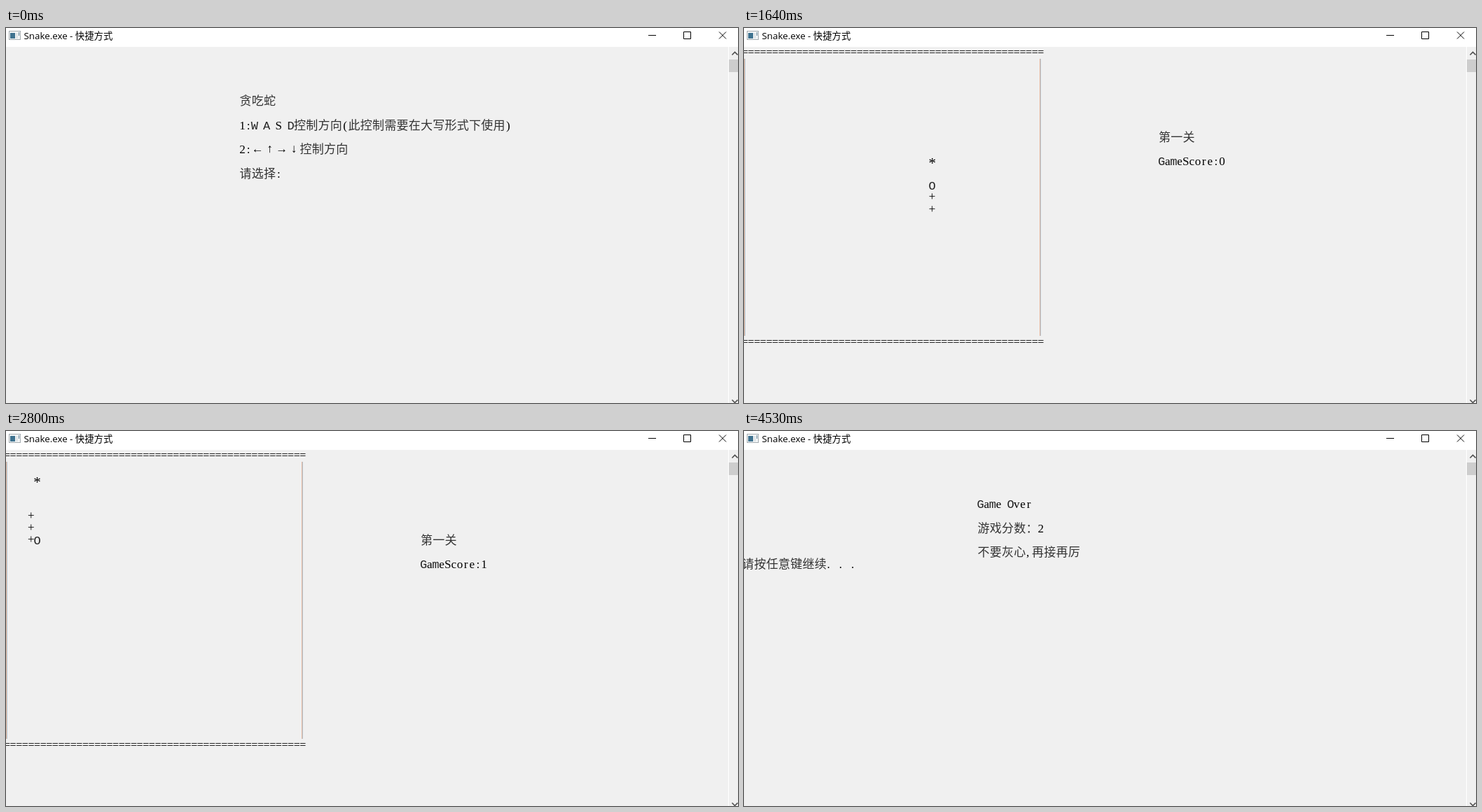
These frames come from a looping animation (1045 by 536 pixels, 4.75 s). An HTML page:

```html
<!DOCTYPE html>
<html lang="zh-CN">
<head>
<meta charset="utf-8">
<title>Snake.exe</title>
<style>
html, body { margin: 0; width: 100%; height: 100%; overflow: hidden; background: #f0f0f0; }
svg { display: block; width: 1045px; height: 536px; }
#screen text { text-anchor: middle; fill: #000; }
#screen .cjk { font: 300 17px "Noto Sans CJK SC", "Noto Sans CJK", sans-serif; fill: #333; }
.thin { font: 17px "Liberation Serif", serif; }
.star { font: 21px "Liberation Serif", serif; }
.rule { font: 16px "Liberation Serif", serif; }
#screen .mono { font: 17px "Liberation Mono", monospace; fill: #222; }
.title { font: 13.35px "Open Sans", "Noto Sans CJK SC", "Noto Sans CJK", sans-serif; }
</style>
</head>
<body>
<svg viewBox="0 0 1045 536">
  <rect width="1045" height="536" fill="#f0f0f0"/>
  <g id="screen"></g>
  <rect width="1045" height="27" fill="#fff"/>
  <rect x="4.5" y="4.5" width="16" height="12" fill="#f4f6f7" stroke="#a3abb0"/>
  <rect x="6" y="7" width="7" height="8" fill="#3f7390"/>
  <rect x="14" y="7" width="3" height="8" fill="#dfe5e8"/>
  <rect x="18" y="6" width="1" height="5" fill="#5f8296"/>
  <text class="title" x="25.5" y="15.5">Snake.exe - 快捷方式</text>
  <g fill="none" stroke="#000">
    <path d="M917 10.5h11M967.5 5.5h10v10h-10zM1018 5.5l10 10M1028 5.5l-10 10"/>
  </g>
  <rect x="1031" y="27" width="1" height="509" fill="#fff"/>
  <rect x="1032" y="45" width="13" height="18" fill="#cdcdcd"/>
  <path d="M1036.5 38.5l4-4 4 4M1036.5 531.5l4 4 4-4" fill="none" stroke="#505050" stroke-width="1.6"/>
</svg>
<script>
const LOOP = 4750;
const CELL = 8.62, ROW = 17.25, LEFT = -11.5, TOP = 35;
const START = -13;
const CORNERS = [[22, 14], [32, 14], [32, 7], [24, 7], [24, 1], [5, 1],
                 [5, 7], [6, 7], [6, 2], [41, 2], [41, 24]];
// time in ms, number of moves made
const PACE = [[1330, -10], [1640, 0], [1860, 9], [2120, 18], [2380, 28], [2420, 29],
              [2800, 44], [2930, 47], [2960, 48], [2990, 49], [3510, 69],
              [4030, 90], [4050, 91], [4500, 105], [4530, 105]];
const SVG = 'http://www.w3.org/2000/svg';
const screen = document.getElementById('screen');

function add(parent, tag, attrs) {
  const el = document.createElementNS(SVG, tag);
  for (const k in attrs) el.setAttribute(k, attrs[k]);
  return parent.appendChild(el);
}

// class, baseline drop and sideways shift of one glyph
function glyph(ch) {
  if (ch === '=') return ['rule', 4.5, 0];
  if (ch === '+') return ['thin', 4.3, 0];
  if (ch === '*') return ['star', 10.2, 0];
  if (ch === '.' || ch === ',') return ['thin', 6, -1.5];
  if (/[←↑→↓]/.test(ch)) return ['thin', 5, 0];
  if (/[GmWADO]/.test(ch)) return ['mono', 6, 0];
  if (ch.charCodeAt(0) > 0x2000) return ['cjk', 6, 0];
  return ['thin', 6, 0];
}

// writes a string on the console grid, wide characters taking two cells
function put(str, col, row) {
  const text = add(screen, 'text', {});
  const mid = TOP + row * ROW;
  for (const ch of str) {
    const size = ch.charCodeAt(0) > 0x2000 ? 2 : 1;
    const [cls, drop, shift] = glyph(ch);
    if (ch !== ' ') {
      const x = LEFT + (col + size / 2) * CELL + shift;
      add(text, 'tspan', { class: cls, x: x.toFixed(2), y: (mid + drop).toFixed(2) }).textContent = ch;
    }
    col += size;
  }
}

// a vertical bar with its warm and cool edge
function wall(x) {
  add(screen, 'rect', { x, y: 44, width: 1, height: 396, fill: '#e3b399' });
  add(screen, 'rect', { x: x + 1, y: 44, width: 1, height: 396, fill: '#b3c6d2' });
}

function menu(first, second, typed) {
  put('贪吃蛇', 40, 4);
  put('1:' + first, 40, 6);
  put('2:' + second, 40, 8);
  put('请选择:', 40, 10);
  if (typed) put('2', 40, 11);
}

function frame(cols) {
  put('='.repeat(Math.min(51, Math.ceil(cols))), 0, 0);
  put('='.repeat(Math.min(51, Math.floor(cols))), 0, 24);
  wall(0);
  if (cols >= 51) wall(422);
}

function place(step) {
  let left = step - START;
  for (let i = 1; i < CORNERS.length; i++) {
    const [x, y] = CORNERS[i - 1];
    const dx = CORNERS[i][0] - x, dy = CORNERS[i][1] - y;
    const len = Math.abs(dx + dy);
    if (left <= len) return [x + Math.sign(dx) * left, y + Math.sign(dy) * left];
    left -= len;
  }
  return CORNERS[CORNERS.length - 1];
}

function stepAt(t) {
  const i = PACE.findIndex(p => p[0] > t);
  const [t0, s0] = PACE[i - 1], [t1, s1] = PACE[i];
  return Math.floor(s0 + (s1 - s0) * (t - t0) / (t1 - t0) + 1e-6);
}

function game(step) {
  const score = step < 2 ? 0 : step < 49 ? 1 : 2;
  frame(51);
  put('第一关', 70, 7);
  put('GameScore:' + score, 70, 9);
  if (step === null) return;
  put('*', ...[[32, 9], [6, 2], [40, 23]][score]);
  for (let i = 0; i < 3 + score; i++) put(i ? '+' : 'O', ...place(step - i));
}

function over() {
  put('Game Over', 40, 4);
  put('游戏分数：2', 40, 6);
  put('不要灰心,再接再厉', 40, 8);
  put('请按任意键继续. . .', 1, 9);
}

// picks the scene for a time: a key for it and the way to draw it
function scene(t) {
  if (t < 400) {
    const typed = t >= 200;
    return ['keys' + typed, () => menu('W A S D控制方向(此控制需要在大写形式下使用)', '←↑→↓控制方向', typed)];
  }
  if (t < 800) {
    const typed = t >= 600;
    return ['mode' + typed, () => menu('简单', '困难', typed)];
  }
  if (t < 1300) {
    const cols = 2.4 + 3 * Math.floor((t - 800) / 28);
    return ['frame' + cols, () => frame(cols)];
  }
  if (t < 1330) return ['ready', () => game(null)];
  if (t < 4530) {
    const step = stepAt(t);
    return ['game' + step, () => game(step)];
  }
  return ['over', over];
}

let shown = '';
function draw(t) {
  const [key, paint] = scene(t);
  if (key === shown) return;
  shown = key;
  screen.replaceChildren();
  paint();
}

const begin = performance.now();
function tick() {
  draw((performance.now() - begin) % LOOP);
  requestAnimationFrame(tick);
}
tick();
</script>
</body>
</html>
```
